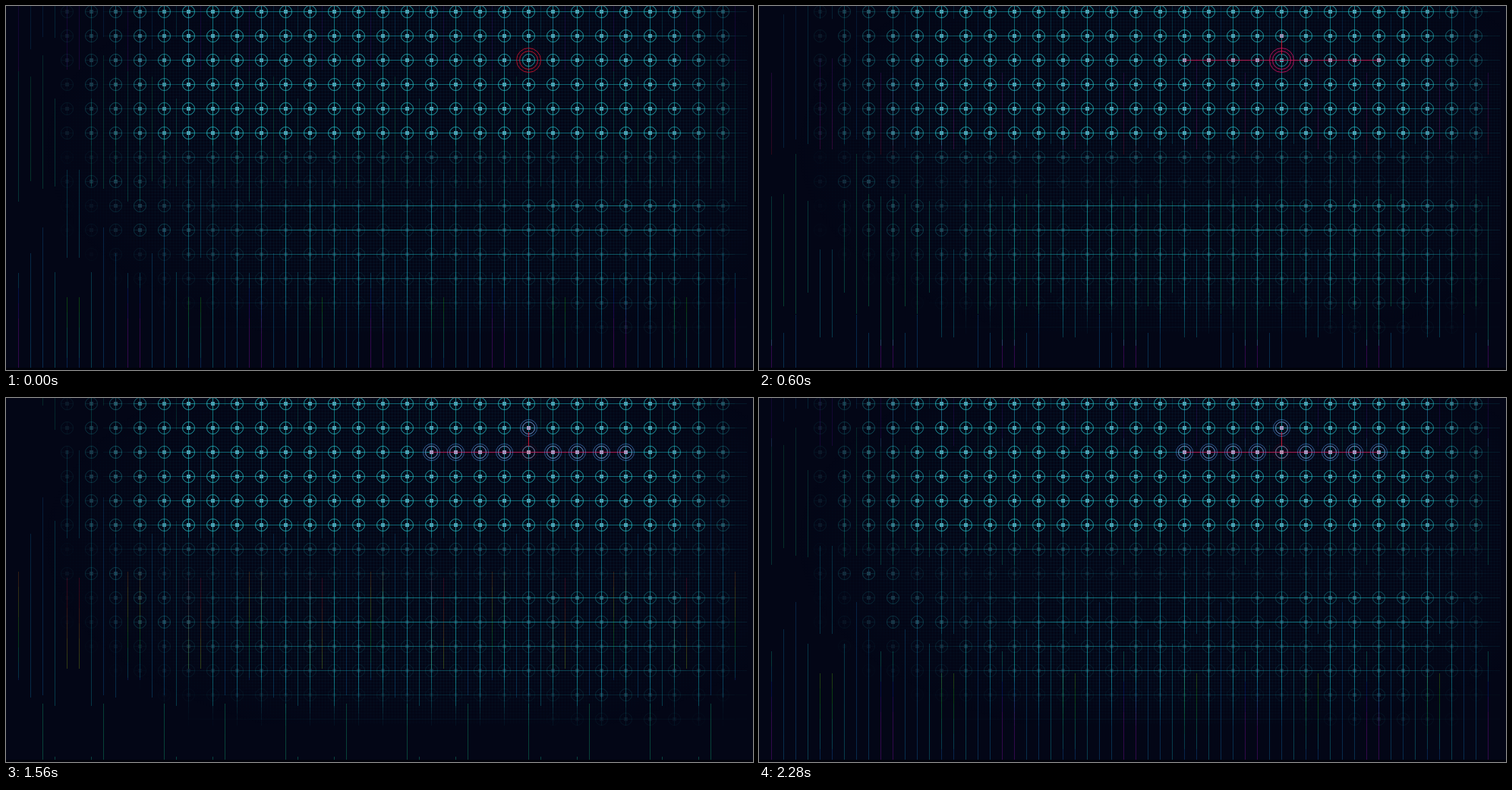
Write an HTML page that moves like this. It is 984x480 px and loops after 2.4 s.

```html
<!DOCTYPE html>
<html lang="en">
<head>
<meta charset="utf-8">
<title>Node grid</title>
<style>
  html, body { margin: 0; width: 100%; height: 100%; overflow: hidden; background: #030616; }
  svg { display: block; }
</style>
</head>
<body>
<svg width="984" height="480" viewBox="0 0 984 480">
  <defs>
    <pattern id="mesh" width="4" height="4" patternUnits="userSpaceOnUse">
      <path d="M0 3.5H4M.5 0V4" stroke="#12566a" stroke-opacity=".11" fill="none"/>
    </pattern>
    <radialGradient id="fade" gradientUnits="userSpaceOnUse" cx="0" cy="0" r="1"
        gradientTransform="translate(570 190) scale(520 270)">
      <stop offset=".65" stop-color="#fff"/>
      <stop offset="1" stop-color="#000"/>
    </radialGradient>
    <mask id="soft"><rect width="984" height="480" fill="url(#fade)"/></mask>
    <g id="tile"></g>
  </defs>
  <rect width="984" height="480" fill="#030616"/>
  <rect width="977" height="430" fill="url(#mesh)" mask="url(#soft)"/>
  <g id="rain"></g>
  <g id="lines" fill="#19aab4"></g>
  <g id="nodes"></g>
  <g id="signal"></g>
  <rect y="477" width="984" height="3" fill="#01020a"/>
</svg>
<script>
const LOOP = 2400, STEP = 120, STEPS = LOOP / STEP;
const PITCH = 32, LEFT = 80, TOP = 7, COLS = 28, ROWS = 14;
const byId = id => document.getElementById(id);
const clamp = v => Math.max(0, Math.min(1, v));
const ramp = (v, a, b) => clamp((v - a) / (b - a));
const bell = (v, mid, width) => Math.exp(-(((v - mid) / width) ** 2));

const rect = (x, y, w, h, alpha, fill = '') => alpha < .01 ? '' :
  `<rect x="${x}" y="${y}" width="${w}" height="${h}" opacity="${alpha.toFixed(3)}"${fill && ` fill="${fill}"`}/>`;
const ring = (x, y, r, color, alpha = 1) =>
  `<circle cx="${x + .5}" cy="${y + .5}" r="${r}" fill="none" stroke="${color}" opacity="${alpha.toFixed(3)}"/>`;
const core = (x, y, color, alpha = 1) => rect(x - 2, y - 2, 5, 5, alpha, color);

function nodeAlpha(x, row) {
  const right = ramp(x, 1000, 860);
  const start = 58 + Math.max(0, row - 9) * 28;
  const edge = ramp(x, start, start + 180) * right;
  const east = ramp(x, 610, 740) * right;
  if (row < 6) return edge;
  return [
    edge * .3,
    edge * .12 + .28 * bell(x, 144, 50),
    edge * .15 + .22 * bell(x, 180, 50) + .38 * east,
    edge * .22 + .18 * bell(x, 200, 55) + .15 * east,
    edge * .22,
    edge * .17 + .07 * east,
    edge * .08 + .14 * bell(x, 800, 70),
    .1 * bell(x, 820, 85)
  ][row - 6];
}

function rowAlpha(x, row) {
  const right = ramp(x, 985, 860);
  if (row < 6) return .55 * ramp(x, 110, 270) * right;
  const low = ramp(x, 200, 390) * right;
  return [.25 * ramp(x, 110, 270) * right, .13 * low, .6 * low, .62 * low, .46 * low, .34 * low, .14 * low, .05 * low][row - 6];
}

function columnAlpha(x, y) {
  const right = ramp(x, 985, 860);
  if (y < 183) return .55 * ramp(x, 80, 260) * right;
  if (y < 255) return (.24 + .2 * ramp(x, 600, 720)) * ramp(x, 100, 300) * right;
  return .55 * ramp(x, 170, 370) * right * ramp(y, 432, 365);
}

function buildGrid() {
  let lines = '', nodes = '';
  for (let col = 0; col < COLS; col++) {
    const x = LEFT + col * PITCH;
    for (let y = 0; y < 432; y += 8) lines += rect(x, y, 1, 8, columnAlpha(x, y));
    for (let row = 0; row < ROWS; row++) {
      const y = TOP + row * PITCH, a = nodeAlpha(x, row);
      lines += rect(x, y, 16, 1, rowAlpha(x, row)) + rect(x + 16, y, 16, 1, rowAlpha(x + 16, row));
      if (a < .02) continue;
      nodes += `<g opacity="${a.toFixed(3)}">` + ring(x, y, 8, '#27bcc2', .8) + core(x, y, '#62a9be', .9) +
        rect(x - 8, y, 17, 1, .5, '#20adb6') + rect(x, y - 8, 1, 17, .5, '#20adb6') + '</g>';
    }
  }
  byId('lines').innerHTML = lines;
  byId('nodes').innerHTML = nodes;
}

// Per column: [head start, head speed, tail start, tail speed, hue, hue bend]
const streaks = [
  [[-3.9, 22, 0, 17.6, 270, .0023], [13.2, 38, 17.4, 33, 165, 0]],
  [[-2.2, 26, 4.5, 21, 200, 0], [13, 33, 17, 31, 152, 0]],
  [[-1.5, 27, 7.3, 23, 205, 0], [12.7, 33, 17.5, 26, 160, 0]],
  [[-1.5, 28, 7, 27, 185, 0], [11.5, 28, 15.5, 27, 165, 0]],
  [[-4, 21, 1.7, 21, 270, .0014], [4.2, 21, 9.7, 21, 188, 0]]
];

function drawStreak(x, step, [headAt, headSpeed, tailAt, tailSpeed, hue, bend]) {
  let out = '';
  for (const k of [step - STEPS, step, step + STEPS]) {
    const top = Math.max(0, Math.round((k - tailAt) * tailSpeed));
    const end = Math.min(480, Math.round((k - headAt) * headSpeed));
    for (let y = top; y < end; y += 20) {
      const h = Math.round(Math.min(645, hue + bend * y * y)) % 360;
      out += rect(x, y, 1, Math.min(20, end - y), .16 + .16 * y / 480, `hsl(${h},85%,42%)`);
    }
  }
  return out;
}

function drawRain(step) {
  let out = '';
  streaks.forEach((column, i) => column.forEach(s => {
    out += drawStreak(16 + i * 16, step, s) + drawStreak(160 - i * 16, step, s);
  }));
  byId('tile').innerHTML = out;
}

const HUB = { x: 688, y: 71 };
const branch = [{ x: 688, y: 39, d: 1 }];
for (let d = 1; d <= 4; d++) branch.push({ x: HUB.x - d * PITCH, y: 71, d }, { x: HUB.x + d * PITCH, y: 71, d });

function drawLinks(reach) {
  const { x, y } = HUB, span = reach * PITCH;
  return rect(x - span, y, span * 2 + 1, 1, .85, '#c8124e') + rect(x, 45, 1, 19, .85, '#e01030');
}

function drawSignal(step) {
  const { x, y } = HUB;
  let out = '';
  if (step < 6) {
    const reach = Math.max(0, step - 1);
    const color = step < 1 ? '#d3122e' : '#d01262';
    if (reach) out += drawLinks(reach);
    out += ring(x, y, 12, color, .9) + ring(x, y, 16, color, .85);
    for (const n of branch) if (n.d <= reach) out += core(n.x, n.y, '#a58fb4', .8);
  } else if (step >= 11) {
    const glow = 1 - Math.abs(step - 16) * .15;
    const full = ramp(glow, .55, 1);
    out = drawLinks(4);
    for (const n of branch) {
      out += ring(n.x, n.y, 11, '#4c8fe0', .25 + glow * .6) +
        ring(n.x, n.y, 8, full > .5 ? '#e02cae' : '#8c68b8', .35 + glow * .6) +
        core(n.x, n.y, '#b096c2', .85);
    }
    out += ring(x, y, 8, full > .5 ? '#e0143c' : '#a8447c', .35 + glow * .6) +
      ring(x, y, 11, '#c01440', .15 + full * .7) + core(x, y, '#c08cae', .85);
  }
  byId('signal').innerHTML = out;
}

let shown = -1;
function render(time) {
  const step = Math.floor(time % LOOP / STEP);
  if (step === shown) return;
  shown = step;
  drawRain(step);
  drawSignal(step);
}

function tick() {
  render(performance.now());
  requestAnimationFrame(tick);
}

buildGrid();
byId('rain').innerHTML = Array.from({ length: 6 }, (_, i) => `<use href="#tile" x="${i * 160}"/>`).join('');
tick();
</script>
</body>
</html>
```
